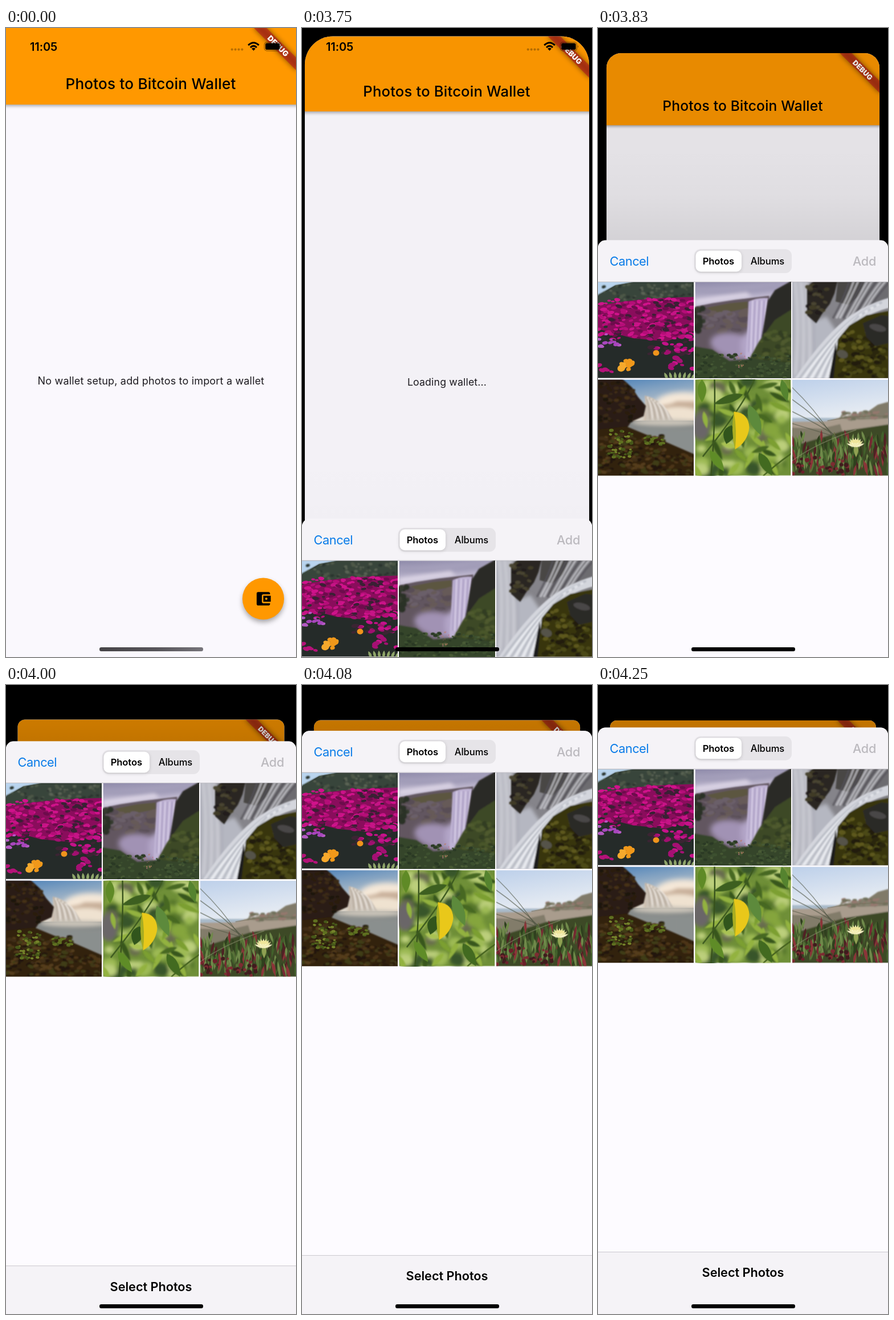
Animation of 509 by 1101 pixels, one loop 5.08 s. Source, as an HTML page:

```html
<!DOCTYPE html>
<html lang="en">
<head>
<meta charset="utf-8">
<title>Photo wallet</title>
<style>
  html, body { margin: 0; width: 100%; height: 100%; overflow: hidden; background: #000; }
  #stage { position: relative; width: 509px; height: 1101px; overflow: hidden; background: #000; }
  #stage > *, #card > * { position: absolute; left: 0; top: 0; }
  svg { display: block; overflow: hidden; }
  text { font-family: Inter, "Open Sans", sans-serif; fill: #000; }
  .mid { text-anchor: middle; }
  #card { width: 509px; height: 1101px; overflow: hidden; transform-origin: 50% 0; background: #faf8fd; }
  #dim { width: 100%; height: 100%; background: #000; }
  #sheet { width: 509px; height: 1101px; }
  #shade { position: absolute; left: 0; top: -160px; width: 509px; height: 180px;
    background: linear-gradient(transparent, rgba(0,0,0,.04) 45%, rgba(0,0,0,.14) 89%); }
  #panel { position: absolute; left: 0; top: 0; width: 509px; height: 1101px; overflow: hidden;
    border-radius: 13px 13px 0 0; background: #fdfbff; }
  #home { left: 164px; top: 1084px; width: 181.5px; height: 6.5px; border-radius: 3.3px; background: #000; }
  #home.idle { background: linear-gradient(90deg, #464447, #57555a 55%, #76747a); }
</style>
</head>
<body>
<div id="stage">
  <div id="card">
    <svg width="509" height="1101">
      <defs>
        <filter id="soft" x="-30%" y="-100%" width="160%" height="300%"><feGaussianBlur stdDeviation="5"/></filter>
        <filter id="low" x="-30%" y="-30%" width="160%" height="160%"><feGaussianBlur stdDeviation="3"/></filter>
        <filter id="haze" x="-10%" y="-10%" width="120%" height="120%"><feGaussianBlur stdDeviation="1.3"/></filter>
      </defs>
      <rect x="-20" y="0" width="549" height="136" opacity=".38" filter="url(#low)"/>
      <rect width="509" height="134" fill="#ff9800"/>
      <text class="mid" x="254" y="107" font-size="26.1" font-weight="500" letter-spacing=".2">Photos to Bitcoin Wallet</text>
      <text id="note" class="mid" x="254.5" y="624" font-size="18" letter-spacing=".18" style="fill:#1d1b20"></text>
      <ellipse cx="451.5" cy="1004" rx="36" ry="36" opacity=".36" filter="url(#soft)"/>
      <circle id="fab" cx="451.5" cy="999" r="36.6"/>
      <path transform="translate(436 983.4) scale(1.305)" d="M21 18v1c0 1.1-.9 2-2 2H5c-1.11 0-2-.9-2-2V5c0-1.1.89-2 2-2h14c1.1 0 2 .9 2 2v1h-9c-1.11 0-2 .9-2 2v8c0 1.1.89 2 2 2h9zm-9-2h10V8H12v8zm4-2.5c-.83 0-1.5-.67-1.5-1.5s.67-1.5 1.5-1.5 1.5.67 1.5 1.5-.67 1.5-1.5 1.5z"/>
      <g transform="translate(509 0) rotate(45)">
        <rect x="-52.2" y="36.5" width="104.4" height="15.7" opacity=".5" filter="url(#soft)"/>
        <rect x="-52.2" y="36.5" width="104.4" height="15.7" fill="#b71c1c" fill-opacity=".627"/>
        <text class="mid" y="49.2" font-size="13.2" font-weight="900" style="fill:#fff">DEBUG</text>
      </g>
    </svg>
    <div id="dim"></div>
  </div>

  <svg width="509" height="60">
    <text x="42" y="40" font-size="20" font-weight="600" letter-spacing="-.1">11:05</text>
    <g opacity=".27"><circle cx="396.7" cy="37.6" r="2.1"/><circle cx="402.6" cy="37.6" r="2.1"/><circle cx="408.5" cy="37.6" r="2.1"/><circle cx="414.4" cy="37.6" r="2.1"/></g>
    <g fill="none" stroke="#000" stroke-width="3">
      <path d="M425.2 30.2Q434.5 21.3 443.8 30.2"/>
      <path d="M429 34.1Q434.5 28.8 440 34.1"/>
    </g>
    <path d="M431.2 36.3Q434.5 33.4 437.8 36.3L434.5 39.8Z"/>
    <rect x="453.4" y="24.8" width="29" height="15" rx="4.4" fill="none" stroke="#000" stroke-opacity=".4" stroke-width="1.2"/>
    <rect x="455.2" y="26.6" width="25.4" height="11.4" rx="2.8"/>
    <path d="M484 30q2.4 2.3 0 4.8z" opacity=".45"/>
  </svg>

  <div id="sheet">
    <div id="shade"></div>
    <div id="panel">
      <svg width="509" height="1101">
        <rect width="509" height="73" fill="#f5f3f7"/>
        <rect y="72.3" width="509" height=".8" fill="#b9b8bd"/>
        <text x="20.5" y="44.5" font-size="21.7" letter-spacing="-.4" style="fill:#087be8">Cancel</text>
        <text x="488" y="44.5" font-size="21.7" font-weight="500" text-anchor="end" letter-spacing="-.3" style="fill:#bcbabf">Add</text>
        <rect x="169" y="15.7" width="171" height="41.6" rx="11" fill="#e6e4e8"/>
        <rect x="171.5" y="19.5" width="80.5" height="37" rx="9" opacity=".14" filter="url(#low)"/>
        <rect x="171.5" y="18.2" width="80.5" height="36.6" rx="9" fill="#fff"/>
        <text class="mid" x="211.3" y="42.5" font-size="16.6" font-weight="600" letter-spacing="-.1">Photos</text>
        <text class="mid" x="297.5" y="42.5" font-size="16.6" font-weight="500" letter-spacing="-.1">Albums</text>
        <g id="grid"></g>
        <rect y="918" width="509" height="200" fill="#f5f3f7"/>
        <rect y="917.6" width="509" height="1" fill="#cbc9ce"/>
        <text class="mid" x="254.5" y="962" font-size="21.7" font-weight="600" letter-spacing="-.03">Select Photos</text>
      </svg>
    </div>
  </div>
  <div id="home"></div>
</div>

<script>
const $ = id => document.getElementById(id);

// ---- photo thumbnails, each on a 168 x 168 tile ----
let seed = 7;
const rnd = () => (seed = (seed * 16807) % 2147483647) / 2147483647;
const pick = list => list[Math.floor(rnd() * list.length)];
const area = (d, fill) => `<path d="${d}" fill="${fill}"/>`;
const line = (d, stroke, w, o = 1) =>
  `<path d="${d}" fill="none" stroke="${stroke}" stroke-width="${w}" stroke-opacity="${o}" stroke-linecap="round"/>`;
const oval = (x, y, rx, ry, fill, turn = 0) =>
  `<ellipse transform="translate(${x.toFixed(1)} ${y.toFixed(1)}) rotate(${turn | 0})" rx="${rx.toFixed(1)}" ry="${ry.toFixed(1)}" fill="${fill}"/>`;
const blur = (kind, inner) => `<g filter="url(#${kind})">${inner}</g>`;
const many = (n, fn) => Array.from({ length: n }, (_, i) => fn(i)).join('');
const scatter = (n, x, y, w, h, r, flat, colors) =>
  many(n, () => {
    const k = r * (.6 + rnd() * .7);
    return oval(x + rnd() * w, y + rnd() * h, k, k * flat, pick(colors), rnd() * 40 - 20);
  });
const sky = (id, a, b) =>
  `<linearGradient id="${id}" x2=".3" y2="1"><stop stop-color="${a}"/><stop offset="1" stop-color="${b}"/></linearGradient>`;
const back = fill => `<rect width="168" height="168" fill="${fill}"/>`;
const leaf = (x, y, len, wide, turn, fill) =>
  `<path transform="translate(${x.toFixed(1)} ${y.toFixed(1)}) rotate(${turn | 0})" d="M0 0Q${wide} ${len * .4} 0 ${len}Q${-wide} ${len * .4} 0 0" fill="${fill}"/>`;

const flowers = () => back('#252b29')
  + area('M0 0H64L30 6L0 24Z', '#b9d4ee')
  + blur('haze', area('M0 22L30 6L60 0H168V40H0Z', '#39443b')
    + scatter(80, 10, 4, 158, 32, 3, .7, ['#4d5847', '#2b352f', '#5a6454']))
  + area('M0 42Q60 28 168 26V86L120 104L60 98L0 82Z', '#8a0d5c')
  + scatter(240, 0, 30, 168, 72, 5, .5, ['#d0128b', '#b50e78', '#c61486', '#6d0c4c', '#3a2034'])
  + scatter(30, 84, 92, 84, 34, 6, .5, ['#c5128a', '#a11070', '#3b2433'])
  + scatter(14, 0, 78, 46, 36, 4.5, .6, ['#a846bd', '#b45ac4', '#2a302d'])
  + scatter(8, 114, 132, 54, 22, 6, .6, ['#c8158a', '#a51073'])
  + scatter(5, 0, 142, 24, 16, 5, .6, ['#b51279'])
  + scatter(10, 36, 136, 26, 18, 5.5, .8, ['#f0981a', '#f7a92c'])
  + oval(102, 124, 5.5, 5, '#f0941c')
  + many(7, i => leaf(122 + i * 7, 170, 13, 5, 155 + i * 10, '#8fa56a'));

const lilacFall = () => sky('s2', '#8f8baa', '#d5cde0') + `<rect width="168" height="50" fill="url(#s2)"/>`
  + `<rect y="44" width="168" height="124" fill="#6d6170"/>`
  + blur('low', area('M0 10Q60 18 130 4L168 0V10Q90 26 0 18Z', '#a19cb8') + area('M0 30L90 18L100 26L0 40Z', '#dad3e4'))
  + blur('haze', area('M-4 44L30 37L70 31L104 27L130 24V140H-4Z', '#625660')
    + area('M20 45L60 37L92 34L92 46L40 56Z', '#5c563f')
    + scatter(40, 10, 50, 80, 36, 8, .5, ['#6b5e69', '#594d55', '#665a58']))
  + blur('soft', oval(70, 112, 44, 22, '#a192b4', 12) + oval(100, 112, 20, 28, '#b3a6c8'))
  + blur('haze', area('M94 34Q110 26 128 28L122 84L116 134H88L91 90Z', '#bfb3d4')
    + many(8, i => line(`M${97 + i * 4} 33L${94 + i * 3.6} 122`, i % 2 ? '#dfd7ec' : '#a599be', 2, .7)))
  + blur('haze', area('M128 32L140 14L172 -4V172H96L98 134L116 100Z', '#2c2925')
    + area('M172 46L140 66L112 104L92 140L172 150Z', '#3d4926')
    + scatter(60, 114, 82, 56, 64, 5, .6, ['#485629', '#333e22', '#4f5a2e'])
    + scatter(28, -2, 46, 16, 40, 5, .9, ['#2b3026', '#343a2e'])
    + area('M-4 112L30 118L60 138L100 134L172 142V172H-4Z', '#34442a'))
  + scatter(110, 0, 126, 168, 42, 3.5, .6, ['#3d5030', '#2a3924', '#485a35'])
  + scatter(14, 72, 124, 18, 26, 1, 1, ['#c06d8b', '#b77f60']);

const rapids = () => back('#85848a')
  + blur('low', area('M-6 -6H26L34 70L60 60L80 90L60 174H-6Z', '#b5b7c1')
    + many(7, i => line(`M${i * 5} 0Q${8 + i * 5} 70 ${i * 6} 160`, i % 2 ? '#eff0f4' : '#9d9faa', 4, .7))
    + area('M98 -6H174V44L120 60L90 70Z', '#6d6c70'))
  + blur('haze', area('M26 8L40 -4H80L74 20L66 38L52 56L42 72L26 58Z', '#2a2722')
    + scatter(24, 28, 6, 34, 48, 5, .6, ['#3f3b28', '#211f1c', '#4a4432'])
    + area('M80 -4H128L118 24L98 40L76 34Z', '#484644')
    + many(10, i => line(`M${100 + i * 8} -2Q${92 + i * 6} 26 ${72 + i * 6} 62`, i % 3 ? '#d2d2d8' : '#55545a', 4, .65)))
  + blur('haze', area('M174 26Q124 40 92 66Q48 104 2 172H66Q72 116 100 82Q126 56 174 44Z', '#d4d6dd')
    + many(9, i => line(`M${156 - i * 5} ${36 + i * 3}Q${92 - i * 2} ${58 + i * 6} ${10 + i * 7} 172`, i % 2 ? '#f6f7fa' : '#aeb1bb', 4, .6))
    + area('M64 172L76 106L84 172Z', '#1e1c1a')
    + area('M72 172L80 100L100 76L130 58L172 50V172Z', '#38360f')
    + scatter(110, 84, 84, 80, 82, 5, .7, ['#4b4917', '#2a260f', '#5d581b', '#201d11'])
    + area('M124 72L156 58L172 60V106L146 112L130 96Z', '#2b2928')
    + oval(150, 80, 15, 6, '#4a4746', 14) + oval(88, 126, 10, 7, '#55524a', 20));

const goldenFall = () => sky('s4', '#4a80b8', '#efe3d3') + `<rect width="168" height="80" fill="url(#s4)"/>`
  + blur('soft', oval(150, 44, 50, 22, '#f5e8d8'))
  + blur('low', area('M84 46Q120 48 138 38L174 38V84H80Z', '#c7af99') + oval(140, 62, 40, 14, '#efe2d0'))
  + blur('haze', area('M82 28Q96 30 108 40L122 54L134 74H84Z', '#cbc1b6')
    + many(8, i => line(`M${84 + i * 3} ${30 + i * 1.5}Q${90 + i * 4} 42 ${91 + i * 5} 72`, i % 2 ? '#f4efe8' : '#b3a798', 3, .6)))
  + `<rect y="72" width="168" height="96" fill="#858988"/>`
  + blur('low', oval(120, 75, 60, 6, '#c9c3b8') + many(6, i => line(`M70 ${88 + i * 7}L176 ${90 + i * 7}`, '#9ca09f', 3, .6)))
  + blur('haze', area('M-4 -4H40L60 14L70 30L84 46L80 64L58 74L50 86L-4 94Z', '#2a1e12')
    + scatter(75, -2, 4, 68, 70, 4, .6, ['#36271605', '#3a2a18', '#1e160d', '#473319'])
    + area('M-4 88L50 82L84 96L112 106L172 132V172H-4Z', '#30210f')
    + scatter(150, 0, 96, 116, 70, 5, .55, ['#412e14', '#22180c', '#553c1a', '#3f3c16'])
    + scatter(50, 108, 130, 60, 38, 4.5, .55, ['#4d3618', '#291c0e', '#413915']))
  + scatter(45, 16, 88, 44, 50, 3.2, .7, ['#5f7020', '#465719', '#74822a'])
  + scatter(22, 82, 100, 34, 16, 3, .6, ['#5f7020', '#4a5a1b']);

const leaves = () => back('#6f8f38')
  + blur('low', scatter(80, 0, 0, 168, 168, 12, .8, ['#9dba54', '#55752c', '#85a53e', '#38552a', '#bccf7c', '#686a50'])
    + oval(10, 82, 16, 24, '#6a6668'))
  + blur('haze', many(34, () => leaf(rnd() * 168, rnd() * 150, 26 + rnd() * 18, 9, rnd() * 160 - 80, pick(['#7c9f30', '#466822', '#93b23f', '#38561f', '#a9c252']))))
  + line('M34 0Q36 70 28 168', '#38521d', 2.4)
  + line('M104 0Q86 44 14 134', '#3d5a20', 2.4)
  + line('M168 130Q140 150 120 168', '#46631f', 2.4)
  + leaf(84, 26, 54, 14, 72, '#3d5f20') + leaf(12, 0, 40, 15, 0, '#5f8a26')
  + leaf(94, 44, 58, 19, -22, '#5d8a3c') + leaf(152, 0, 40, 13, -14, '#55832f')
  + leaf(64, 80, 34, 20, 16, '#31551c') + leaf(26, 124, 44, 15, -34, '#5f8c27')
  + leaf(112, 128, 46, 17, -30, '#426a20')
  + area('M68 56Q94 58 95 84Q92 110 70 122Q64 88 68 56Z', '#e9c81a')
  + area('M68 56Q74 90 70 122Q62 90 68 56Z', '#a8ad22');

const dunes = () => sky('s6', '#bdd0ea', '#edf0f4') + `<rect width="168" height="80" fill="url(#s6)"/>`
  + blur('haze', `<rect x="-4" y="67" width="94" height="10" fill="#a9bac9"/>`
    + area('M-4 74L60 73L100 62L140 56L172 48V172H-4Z', '#a99c8d')
    + area('M76 68L130 58L150 44L172 38V68L120 70Z', '#807a69')
    + scatter(50, 84, 56, 84, 14, 4, .5, ['#6f705a', '#94786e', '#858270'])
    + area('M-4 84L50 86L84 78L90 98L-4 122Z', '#827b6b')
    + area('M-4 118L50 102L90 90L172 78V172H-4Z', '#3c4a26'))
  + many(190, i => leaf(rnd() * 176 - 4, 88 + rnd() * 62, 18 + rnd() * 14, 4.5, rnd() * 36 - 18,
      pick(i % 4 ? ['#587238', '#42602b', '#6f894a', '#2f401e'] : ['#762a32', '#8b3539', '#502124'])))
  + scatter(40, 0, 136, 100, 30, 3.5, .9, ['#6b1f2a', '#401b1d', '#7d2b32'])
  + many(4, i => line(`M0 ${14 + i * 21}Q${38 + i * 4} ${50 + i * 14} ${70 + i * 6} ${98 + i * 2}`, '#4a503f', 1.1, .8))
  + line('M0 142Q40 112 112 88', '#8c9270', 1) + line('M62 72Q110 62 168 64', '#77705c', 1)
  + leaf(112, 112, 24, 8, 0, '#8fa052')
  + many(9, i => leaf(111, 118, 17, 4, 112 + i * 17, i % 2 ? '#efe9a6' : '#f8f3c8'))
  + oval(111, 108, 9, 3, '#efe59a');

$('grid').innerHTML = [flowers, lilacFall, rapids, goldenFall, leaves, dunes].map((draw, i) =>
  `<svg x="${(i % 3) * 170.5}" y="${73.2 + (i > 2 ? 170.6 : 0)}" width="168" height="168" viewBox="0 0 168 168">${draw()}</svg>`).join('');

// ---- motion: a critically damped spring, shown at 12 pictures a second ----
const LOOP = 5080, STEP = 1000 / 12, TAP = 44, REST = 51, LAUNCH = 3701, RATE = 0.0188;
let shown = -1;

function spring(t) {
  const k = Math.max(0, t - LAUNCH) * RATE;
  return 1 - (1 + k) * Math.exp(-k);
}

function pose(step) {
  const p = spring(step * STEP), tapped = step >= TAP;
  $('note').textContent = tapped ? 'Loading wallet...' : 'No wallet setup, add photos to import a wallet';
  $('fab').setAttribute('fill', tapped ? '#eaa442' : '#ff9800');
  $('home').className = tapped ? '' : 'idle';
  $('card').style.transform = `translateY(${62 * p}px) scale(${1 - .0825 * p})`;
  $('card').style.borderRadius = p ? `${62 - 49 * p}px` : 0;
  $('dim').style.opacity = .125 * p;
  $('shade').style.opacity = p * p;
  $('sheet').style.transform = `translateY(${1101 - 1027 * p}px)`;
}

function tick() {
  // delays are stored in whole hundredths, so a step may fall up to 3.4 ms early
  const t = performance.now() % LOOP;
  const step = Math.min(REST, Math.floor((t + 3.4) / STEP));
  if (step !== shown) pose(shown = step);
  requestAnimationFrame(tick);
}
tick();
</script>
</body>
</html>
```
